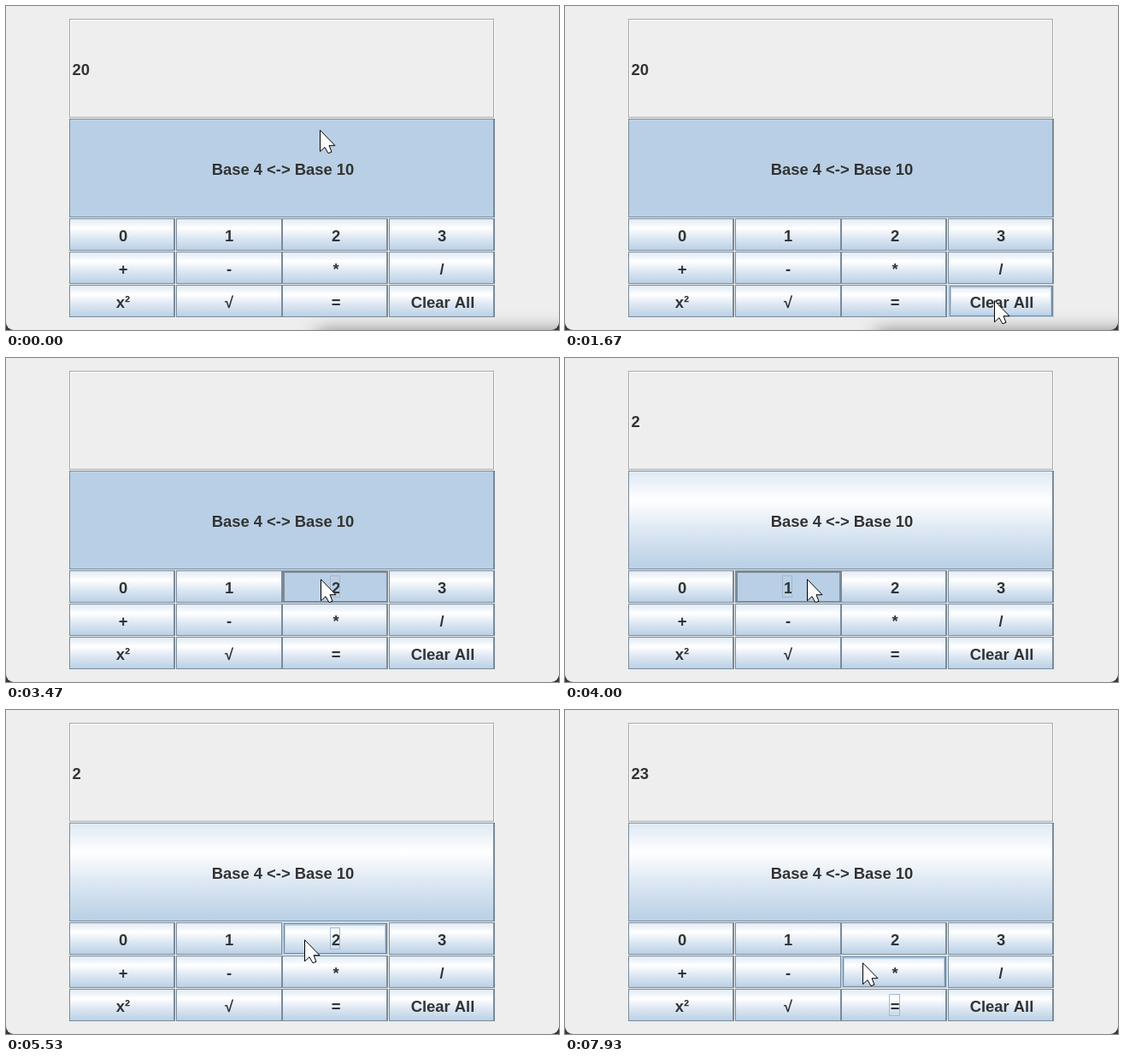
An HTML page with a canvas for the animation above (8000 ms loop, 647x380 px).

```html
<!DOCTYPE html>
<html lang="en">
<head>
<meta charset="utf-8">
<title>Base 4 calculator</title>
<style>
  html, body { margin: 0; width: 100%; height: 100%; overflow: hidden; background: #eee; }
  canvas { display: block; }
</style>
</head>
<body>
<canvas id="stage" width="647" height="380"></canvas>
<script>
const ctx = document.getElementById('stage').getContext('2d');
const W = 647, H = 380, FPS = 15, LOOP = 8000;
const DARK = '#7a8a99', BLUE = '#b8cfe5', PALE = '#dde8f3', FOCUS = '#a3b8cc', INK = '#333';
const FONT = 'bold 18.4px "Liberation Sans", Arial, sans-serif';

const columns = [[74, 124, 137], [199, 124, 261], [323, 124, 386], [448, 124, 510]];
const labels = ['0', '1', '2', '3', '+', '-', '*', '/', 'x²', '√', '=', 'Clear All'];
const keys = labels.map((label, i) => {
  const [x, w, cx] = columns[i % 4];
  const y = 249 + 39 * Math.floor(i / 4);
  return { label, x, y, w, h: 38, cx: i === 11 ? 511 : cx, cy: y + 21, edge: i % 4 === 1 ? 1 : 2 };
});
const baseKey = { label: 'Base 4 <-> Base 10', x: 74, y: 132, w: 498, h: 116, cx: 324, cy: 192, edge: 2 };

// Pointer path: step, x, y
const path = [
  [7, 367, 146], [20, 484, 319], [25, 502, 346], [44, 502, 346], [45, 433, 313],
  [50, 368, 260], [56, 368, 260], [60, 283, 260], [63, 283, 260], [70, 185, 308],
  [73, 160, 300], [76, 160, 300], [81, 349, 270], [85, 349, 270], [91, 366, 353],
  [93, 366, 353], [101, 369, 352], [113, 369, 352], [119, 348, 297]
];

// Clicks: step down, step up, key, display afterwards
const clicks = [
  [30, 32, 11, ''], [52, 53, 2, '2'], [60, 61, 1, '21'],
  [74, 75, 4, ''], [82, 83, 2, '2'], [94, 96, 10, '23']
];

function pointerAt(step) {
  const next = path.findIndex(p => p[0] >= step);
  if (next === 0) return path[0].slice(1);
  const [s0, x0, y0] = path[next - 1], [s1, x1, y1] = path[next];
  const k = (step - s0) / (s1 - s0);
  return [Math.round(x0 + (x1 - x0) * k), Math.round(y0 + (y1 - y0) * k)];
}

function stateAt(step) {
  const state = { text: '20', focus: -1, pressed: -1, baseOn: step < 53, covered: step < 30 };
  for (const [down, up, key, text] of clicks) {
    if (step < down) break;
    state.focus = key;
    if (step < up) state.pressed = key;
    else state.text = text;
  }
  return state;
}

function fill(color, x, y, w, h) {
  ctx.fillStyle = color;
  ctx.fillRect(x, y, w, h);
}

function frame(color, x, y, w, h, left = 1, top = 1, right = 1, bottom = 1) {
  fill(color, x, y, w, top);
  fill(color, x, y + h - bottom, w, bottom);
  fill(color, x, y, left, h);
  fill(color, x + w - right, y, right, h);
}

function text(label, x, y, align) {
  ctx.fillStyle = INK;
  ctx.textAlign = align;
  ctx.fillText(label, x, y);
}

function drawKey(key, { down, selected, hover, focus }) {
  const { label, x, y, w, h, cx, cy, edge } = key;
  if (down || selected) {
    fill(BLUE, x, y, w, h);
  } else {
    const shade = ctx.createLinearGradient(0, y, 0, y + h);
    [[0, PALE], [0.3, '#fff'], [0.6, PALE], [1, BLUE]].forEach(s => shade.addColorStop(...s));
    fill(shade, x, y, w, h);
  }
  if (down) {
    frame(DARK, x, y, w, h, 3, 3, 2, 2);
  } else if (hover) {
    frame(BLUE, x, y, w, h, 5, 5, 5, 5);
    frame(DARK, x + 2, y + 1, w - 3, h - 2, 1, 1, edge, 1);
    const shade = ctx.createLinearGradient(0, y, 0, y + h);
    [[0, PALE], [0.3, '#fff'], [0.6, PALE], [1, BLUE]].forEach(s => shade.addColorStop(...s));
    fill(shade, x + 4, y + 4, w - 8, h - 8);
  } else {
    frame(DARK, x, y, w, h, 1, 1, edge, 1);
  }
  text(label, cx, cy + 6, 'center');
  if (focus) {
    const tw = ctx.measureText(label).width;
    frame(FOCUS, Math.round(cx - tw / 2 - 1.5), cy - 15, Math.round(tw + 2), 26);
  }
}

function drawDisplay(value) {
  frame('#fff', 75, 16, 497, 116);
  frame('#a6a6a6', 74, 15, 497, 116);
  text(value, 77.5, 81, 'left');
}

function drawPointer(x, y) {
  const outline = [[0, 0], [0, 25], [5.5, 20], [9.5, 27], [13.5, 25.5], [10.5, 18], [17.5, 18]];
  ctx.beginPath();
  outline.forEach(([dx, dy]) => ctx.lineTo(x + dx + 0.5, y + dy - 0.3));
  ctx.closePath();
  ctx.fillStyle = '#fff';
  ctx.fill();
  ctx.strokeStyle = '#000';
  ctx.lineWidth = 1;
  ctx.stroke();
}

function drawShadow() {
  ctx.save();
  ctx.shadowColor = 'rgba(0,0,0,.5)';
  ctx.shadowBlur = 22;
  fill('#888', 364, 382, 420, 60);
  ctx.restore();
}

function draw(step) {
  const state = stateAt(step);
  const [px, py] = pointerAt(step);
  fill('#33373b', 0, 0, W, H);
  ctx.save();
  ctx.beginPath();
  ctx.roundRect(0, -20, W, H + 20, 9);
  ctx.clip();
  fill('#eee', 0, 0, W, H);
  if (state.covered) drawShadow();
  ctx.restore();

  ctx.font = FONT;
  drawDisplay(state.text);
  drawKey(baseKey, { selected: state.baseOn });
  keys.forEach((key, i) => drawKey(key, {
    down: state.pressed === i,
    hover: px >= key.x && px < key.x + key.w && py >= key.y && py < key.y + key.h,
    focus: state.focus === i
  }));
  drawPointer(px, py);
}

const start = performance.now();
function tick() {
  const time = (performance.now() - start) % LOOP;
  draw(Math.min(119, Math.floor((time + 4) * FPS / 1000)));
  requestAnimationFrame(tick);
}
tick();
</script>
</body>
</html>
```
